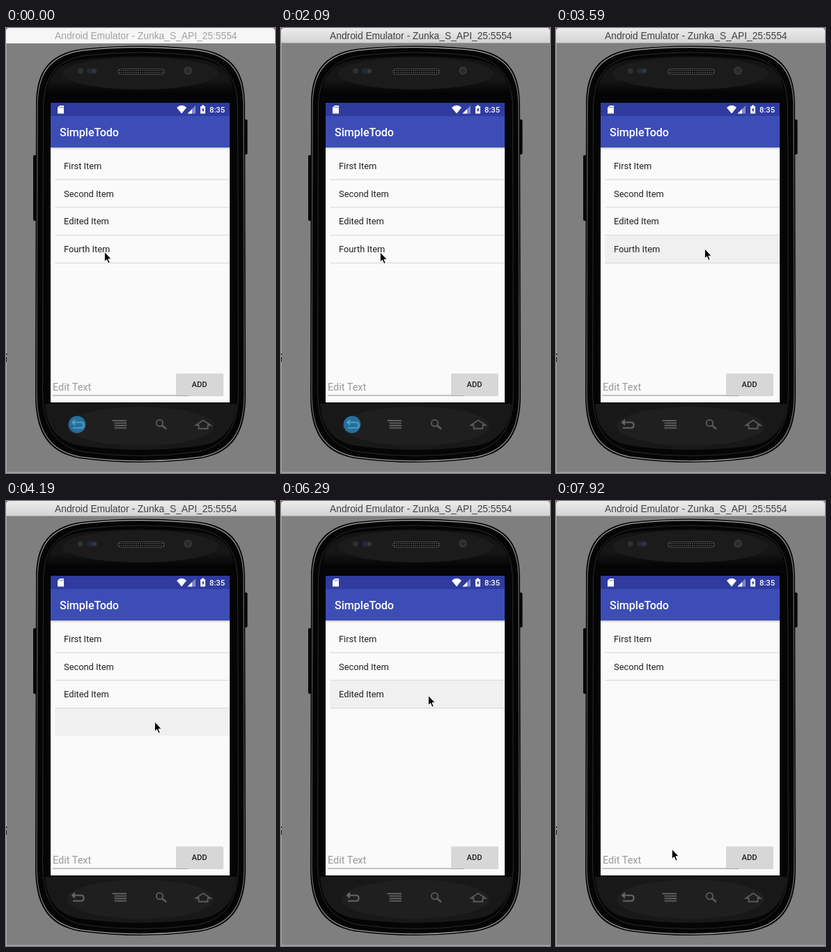
An HTML page that plays this animation: 386x637 px, repeating every 8000 ms.

```html
<!DOCTYPE html>
<html lang="en">
<head>
<meta charset="utf-8">
<title>Todo list on a phone emulator</title>
<style>
  html, body { margin: 0; width: 100%; height: 100%; overflow: hidden; background: #7f7f7f; }
  svg { display: block; width: 386px; height: 637px; }
  text { font-family: Roboto, sans-serif; }
  .medium { font-weight: 500; }
  .item { font-size: 12.85px; fill: #202020; }
  .window-title { font: 13.8px "Liberation Sans", Arial, sans-serif; }
  .key { fill: none; stroke: #5c5c5c; stroke-width: 1.8; }
</style>
</head>
<body>
<svg viewBox="0 0 386 637" xmlns="http://www.w3.org/2000/svg">
  <defs>
    <linearGradient id="bar" x2="0" y2="1">
      <stop stop-color="#ececec"/><stop offset="1" stop-color="#d2d2d2"/>
    </linearGradient>
    <linearGradient id="rim" x2="0" y2="1">
      <stop stop-color="#b0b0b0"/><stop offset=".12" stop-color="#6a6a6a"/>
      <stop offset=".5" stop-color="#444"/><stop offset=".9" stop-color="#666"/>
      <stop offset="1" stop-color="#a0a0a0"/>
    </linearGradient>
    <linearGradient id="shade" x2="0" y2="1">
      <stop stop-color="#000" stop-opacity=".2"/><stop offset="1" stop-color="#000" stop-opacity="0"/>
    </linearGradient>
    <linearGradient id="brow" x2="0" y2="1">
      <stop stop-color="#131313"/><stop offset=".6" stop-color="#161616"/><stop offset="1" stop-color="#020202"/>
    </linearGradient>
    <pattern id="mesh" width="3" height="3" patternUnits="userSpaceOnUse">
      <rect width="3" height="3" fill="#0b0b0b"/><circle cx="1" cy="1" r=".9" fill="#5a5a5a"/>
    </pattern>
    <path id="body" d="M43 110C43 64 60 37 108 30Q150 25.500 193 25.500T278 30C326 37 343 64 343 110
      L344 525C344 576 328 607 281 616Q236 622 193 622T105 616C58 607 42 576 42 525Z"/>
    <clipPath id="screen"><rect x="64" y="107" width="257" height="429"/></clipPath>
  </defs>

  <!-- window -->
  <rect width="386" height="637" fill="#a8a8a8"/>
  <rect x="1" y="20" width="385" height="615.500" fill="#7f7f7f"/>
  <path d="M0 466h1.500v2H0zM0 471h1v7H0z" fill="#222"/>
  <path d="M0 0h5L0 6zM386 0h-4l4 5z" fill="#9c6a66"/>
  <path id="titleBar" d="M0 22V5Q0 0 5 0H381Q386 0 386 5V22Z"/>
  <path id="titleEdge" d="M0 21.500H386" stroke="#a5a5a5"/>
  <text id="windowTitle" class="window-title" x="70" y="16">Android Emulator - Zunka_S_API_25:5554</text>

  <!-- phone -->
  <rect x="39" y="182" width="6" height="94" rx="2" fill="#080808"/>
  <rect x="341" y="131" width="5.500" height="50" rx="2" fill="#080808"/>
  <use href="#body" fill="#050505"/>
  <g fill="none" transform="translate(193 324)">
    <use href="#body" transform="scale(.986 .993) translate(-193 -324)" stroke="url(#rim)" stroke-width="1.300"/>
    <use href="#body" transform="scale(.93 .968) translate(-193 -324)" stroke="#2c2c2c"/>
  </g>
  <path d="M59 96C60 68 74 52 102 46Q193 35 284 46C312 52 326 68 327 96Z" fill="url(#brow)"/>
  <ellipse cx="193" cy="65" rx="112" ry="23" fill="#1b1b1b"/>
  <path d="M56 538H331C329 568 316 589 285 597Q193 611 102 597C70 589 58 568 56 538Z" fill="#181818"/>
  <ellipse cx="193" cy="570" rx="106" ry="28" fill="#1f1f1f"/>
  <rect x="160.500" y="58.500" width="67" height="8" rx="4" fill="url(#mesh)" stroke="#4a4a4a"/>
  <circle cx="107" cy="61.500" r="4" fill="#303030"/>
  <rect x="116" y="57.500" width="15" height="8" rx="4" fill="#25282f"/>
  <circle cx="120.500" cy="61.500" r="2.600" fill="#1b2a45"/>
  <circle cx="126.500" cy="61.500" r="2.500" fill="#383a40"/>
  <circle cx="261" cy="61" r="6" fill="#343434"/>
  <circle cx="261" cy="61" r="3" fill="#242a33"/>
  <rect x="62" y="105" width="261" height="433" fill="#000"/>

  <!-- screen -->
  <g clip-path="url(#screen)">
    <rect x="64" y="107" width="257" height="429" fill="#fafafa"/>
    <g id="list"></g>
    <rect x="64" y="171" width="257" height="3.500" fill="url(#shade)"/>
    <rect x="64" y="126" width="257" height="45" fill="#3c4db5"/>
    <rect x="64" y="107" width="257" height="19" fill="#2f3b9f"/>
    <g fill="#fff">
      <path d="M77 111h6v11.500h-9v-8.500z"/>
      <path d="M77.500 112.500v2M79.500 112.500v2M81.500 112.500v2" stroke="#2f3b9f" stroke-width=".8"/>
      <path d="M252 122.500L245 114Q252 107.500 259 114Z"/>
      <path d="M272 111v11.500h-11.500z" fill-opacity=".4"/>
      <path d="M267 116v6.500h-6.500z"/>
      <path d="M281 110.500h3v1.500h2v10.500h-7V112h2z"/>
      <path d="M283.300 113.500l-2.500 4.200h1.500v3l2.500-4.200h-1.500z" fill="#2f3b9f"/>
      <text class="medium" x="292" y="121" font-size="11.240">8:35</text>
      <text class="medium" x="77" y="155" font-size="16.060">SimpleTodo</text>
    </g>
    <text x="67" y="519" font-size="14.460" fill="#999">Edit Text</text>
    <path d="M67 526H262" stroke="#8c8c8c"/>
    <rect x="244" y="496" width="68" height="31" rx="2" fill="#000" fill-opacity=".15"/>
    <rect x="244" y="494.500" width="68" height="31.500" rx="2" fill="#d6d7d6"/>
    <text class="medium" x="277.500" y="514" font-size="11.240" fill="#1f1f1f" text-anchor="middle">ADD</text>
  </g>

  <!-- hardware keys -->
  <circle id="backGlow" cx="102" cy="567.500" r="12.300" fill="#246f9b"/>
  <g id="backKey" class="key">
    <path d="M97 564.500H108Q111.500 564.500 111.500 568.500T108 572.500H96" stroke-width="2.200"/>
    <path d="M98.500 560.500L94 564.500L98.500 568.500Z" fill="currentColor" stroke-width="1"/>
  </g>
  <path class="key" d="M152.500 562H173M155.500 565.500H173M155.500 569H173M155.500 572.500H173"/>
  <g class="key">
    <circle cx="220.500" cy="565.500" r="4.700"/><path d="M224 569L230 574" stroke-width="2.600"/>
    <path d="M272.500 568.500L283 561.500L293.500 568.500H289.500V573.500H276.500V568.500Z"/>
  </g>

  <g id="cursor" stroke-linejoin="round">
    <path id="arrow" d="M1.300 .3V14.600L4.500 11.600L6.800 17L9.200 16L6.900 10.800H11.300Z" stroke="#fff"/>
  </g>
</svg>

<script>
const LOOP = 8000;
const ACTIVE_AT = 290, BACK_OFF_AT = 3440;

// Times: row pressed, item removed, ripple gone, highlight cleared.
const ROWS = [
  { label: "First Item" },
  { label: "Second Item" },
  { label: "Edited Item", press: 6290, remove: 6580, settle: 6880, clear: 7030, touch: 212 },
  { label: "Fourth Item", press: 3590, remove: 3890, settle: 4190, clear: 4640, touch: 215 }
];
const ROW_TOP = 177.7, ROW_PITCH = 39.8;

// [time, x, y]
const CURSOR = [
  [0, 140, 320], [2090, 141, 320.5], [2540, 140.5, 320], [2840, 151, 319],
  [2990, 195, 318.5], [3140, 212, 317], [3590, 212, 315.5], [4640, 216, 315],
  [4790, 220, 308], [4940, 212, 284], [5090, 210, 278], [7170, 211, 298],
  [7320, 221, 374], [7470, 237, 458], [7620, 238, 460], [7920, 165, 498]
];

const byId = id => document.getElementById(id);
const show = (el, on) => el.setAttribute("visibility", on ? "visible" : "hidden");

function add(parent, tag, attrs, text = "") {
  const el = document.createElementNS("http://www.w3.org/2000/svg", tag);
  for (const name in attrs) el.setAttribute(name, attrs[name]);
  el.textContent = text;
  return parent.appendChild(el);
}

ROWS.forEach((row, i) => {
  const list = byId("list"), top = ROW_TOP + i * ROW_PITCH;
  const wide = { x: 70.5, width: 250.5 };
  row.highlight = add(list, "rect", { ...wide, y: top, height: 38.8, fill: "#f0f0f0" });
  row.ripple = add(list, "circle", { cx: row.touch || 0, cy: top + 18.8, r: 16, fill: "#e6e6e6" });
  row.text = add(list, "text", { x: 83, y: Math.round(top + 24.1), class: "item" }, row.label);
  row.line = add(list, "rect", { ...wide, y: top + 38.8, height: 1, fill: "#d4d4d4" });
});

function draw(t) {
  const active = t >= ACTIVE_AT, glowing = t < BACK_OFF_AT;
  byId("titleBar").setAttribute("fill", active ? "url(#bar)" : "#f6f6f6");
  byId("windowTitle").setAttribute("fill", active ? "#404040" : "#a2a2a2");
  show(byId("titleEdge"), active);
  show(byId("backGlow"), glowing);
  byId("backKey").style.stroke = byId("backKey").style.color = glowing ? "#5599bd" : "#666";

  for (const { press, remove, settle, clear, ...row } of ROWS) {
    const present = !(t >= remove);
    show(row.text, present);
    show(row.line, present);
    show(row.highlight, t >= press && t < clear);
    show(row.ripple, t >= remove && t < settle);
  }

  const [, x, y] = CURSOR.findLast(step => step[0] <= t);
  byId("cursor").setAttribute("transform", `translate(${x} ${y})`);
}

const start = performance.now();
function tick() {
  draw((performance.now() - start) % LOOP);
  requestAnimationFrame(tick);
}
tick();
</script>
</body>
</html>
```
